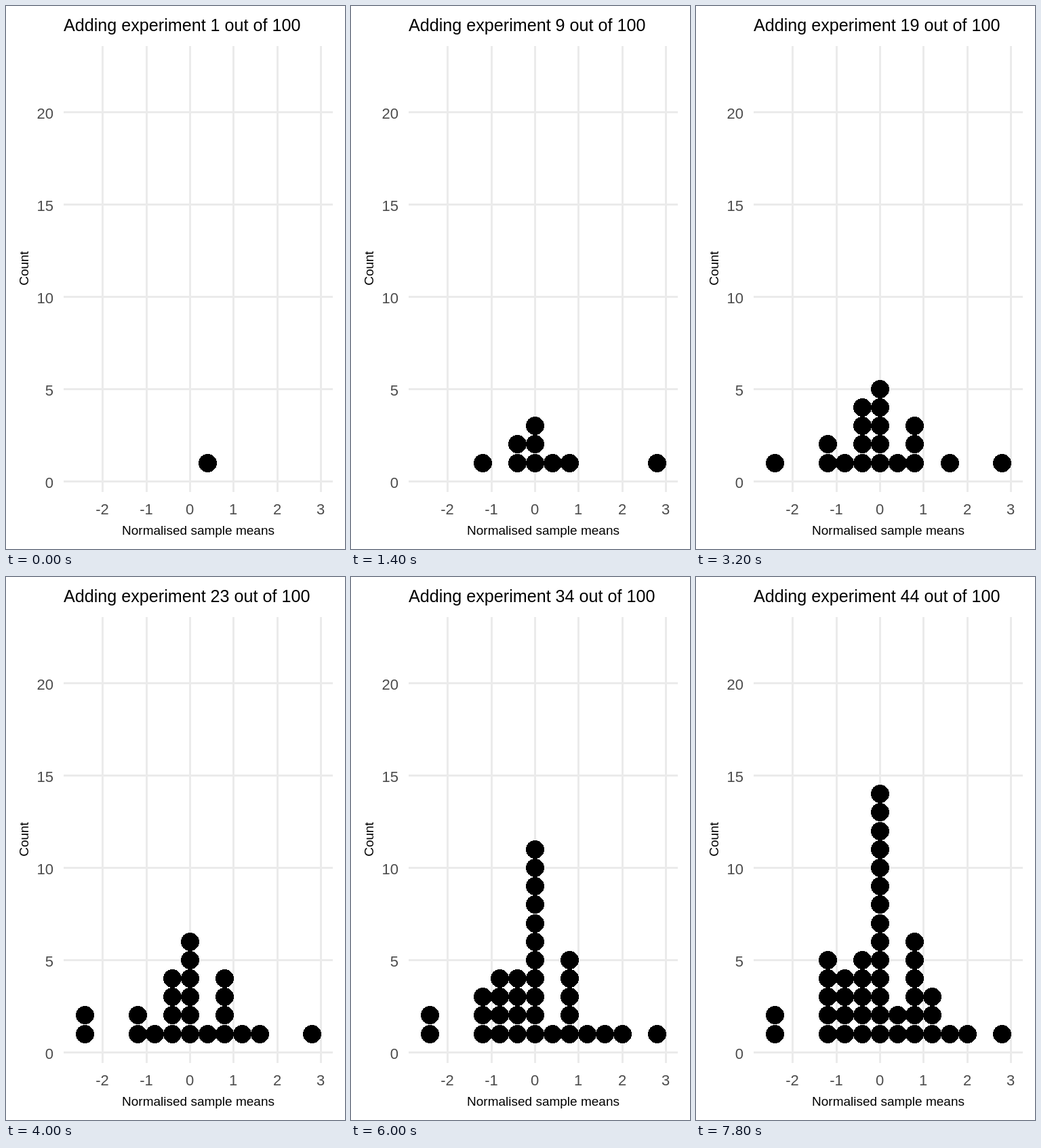
Animation, 500 px wide and 800 px high, one loop 8000 ms. Source, as an HTML page:

```html
<!DOCTYPE html>
<html lang="en">
<head>
<meta charset="utf-8">
<title>Dot plot of sample means</title>
<style>
  html, body { margin: 0; width: 100%; height: 100%; overflow: hidden; background: #fff; }
  svg { display: block; font-family: Arial, "Liberation Sans", sans-serif; font-kerning: none; }
  .grid { stroke: #ebebeb; stroke-width: 3; shape-rendering: crispEdges; }
  .tick { font-size: 22px; fill: #4d4d4d; }
  .axis { font-size: 19px; text-anchor: middle; }
  circle { shape-rendering: crispEdges; }
</style>
</head>
<body>
<svg width="500" height="800" viewBox="0 0 500 800">
  <g id="plot"></g>
  <text id="title" x="85" y="37" font-size="25.15"></text>
  <text class="axis" x="283.5" y="779">Normalised sample means</text>
  <text class="axis" transform="translate(33 386.5) rotate(-90)">Count</text>
</svg>
<script>
const STEP_MS = 200, STEPS = 40, PER_STEP = 1.1;
const panel = { left: 85, right: 482, top: 59, bottom: 716 };

// Sample mean of each experiment, in the order they are added
const means = [
  0.4, 0, -0.4, 0.8, 0, 2.8, -0.4, 0,
  -1.2, -0.4, 0.8, -2.4, 0.8, -0.4,
  0, -1.2, 1.6, 0, -0.8, 0.8, 0,
  1.2, -2.4,
  0, 0, -0.8, 0, -1.2, 0,
  -0.8, 0, 0.8, 2, -0.8,
  0, -1.2, 0.4, 0, -0.4, 0.8, 0,
  1.2, -1.2, 1.2
];

const plot = document.getElementById("plot");
const title = document.getElementById("title");

// Everything in the panel is centred on whole pixels
const snap = v => Math.floor(v) + 0.5;
const xAt = v => snap(271.42 + 64.4 * v);
const yAt = n => snap(700.25 - 27.175 * n);

function add(name, attrs, text = "") {
  const el = document.createElementNS("http://www.w3.org/2000/svg", name);
  for (const key in attrs) el.setAttribute(key, attrs[key]);
  el.textContent = text;
  return plot.appendChild(el);
}

for (let n = 0; n <= 20; n += 5) {
  const y = yAt(n);
  add("line", { class: "grid", x1: panel.left, x2: panel.right, y1: y, y2: y });
  add("text", { class: "tick", x: 70, y: y + 9.5, "text-anchor": "end" }, n);
}
for (let v = -2; v <= 3; v++) {
  const x = xAt(v);
  add("line", { class: "grid", x1: x, x2: x, y1: panel.top, y2: panel.bottom });
  add("text", { class: "tick", x: x - 0.5, y: 749, "text-anchor": "middle" }, v);
}

const heights = {};
const dots = means.map(v => {
  heights[v] = (heights[v] || 0) + 1;
  return add("circle", { cx: xAt(v), cy: yAt(heights[v]), r: 13.5 });
});

let shown = 0;
function draw(now) {
  const step = Math.floor(now / STEP_MS) % STEPS;
  const count = Math.floor(1.5 + PER_STEP * step + 1e-6);
  if (count !== shown) {
    shown = count;
    title.textContent = `Adding experiment ${count} out of 100`;
    dots.forEach((dot, i) => dot.setAttribute("visibility", i < count ? "visible" : "hidden"));
  }
}

const start = performance.now();
function tick() {
  draw(performance.now() - start);
  requestAnimationFrame(tick);
}
tick();
</script>
</body>
</html>
```
